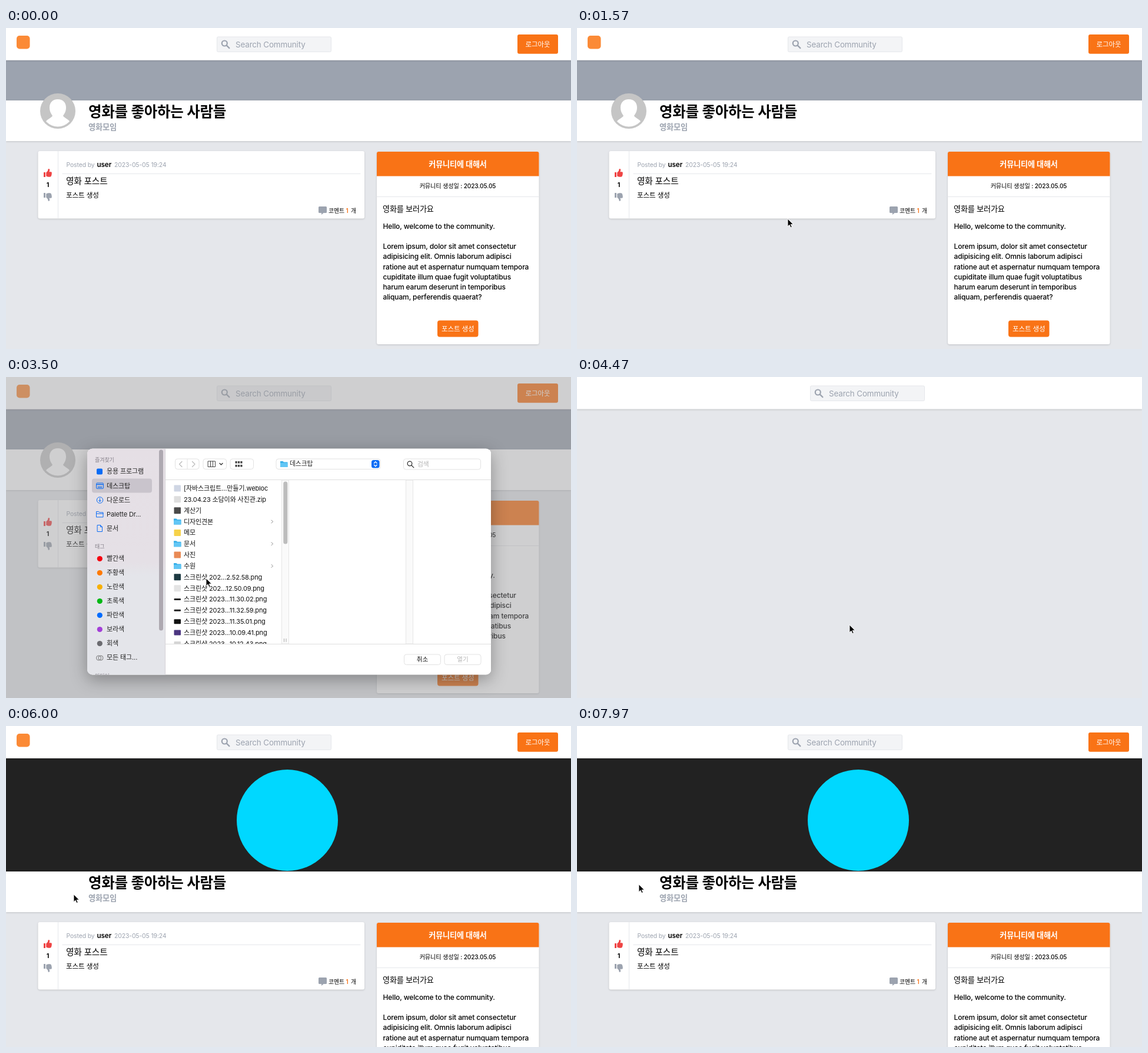
These frames come from a looping animation (960 px wide and 545 px high, 8 s). An HTML page:

```html
<!DOCTYPE html>
<html lang="ko">
<head>
<meta charset="utf-8">
<title>Community</title>
<style>
html, body { margin: 0; width: 100%; height: 100%; overflow: hidden; background: #e5e7eb; }
svg { display: block; width: 100%; height: 100%; }
text { font-family: Inter, "Noto Sans CJK KR", "Noto Sans CJK", sans-serif; letter-spacing: -.01em; white-space: pre; }
.soft { filter: drop-shadow(0 1px 1.5px rgba(0,0,0,.16)); }
#dialog { filter: drop-shadow(0 8px 14px rgba(0,0,0,.32)); }
</style>
</head>
<body>
<svg id="stage" viewBox="0 0 960 545" preserveAspectRatio="none"></svg>
<script>
const GRAY = '#9ca3af', ORANGE = '#f97316', BLUE = '#0a6cf5';

// y is the vertical middle of the line
const text = (x, y, s, size, fill = '#000', weight = 400, anchor = 'start') =>
  `<text x="${x}" y="${y + size * .36}" font-size="${size}" fill="${fill}" font-weight="${weight}" text-anchor="${anchor}">${s}</text>`;
const rect = (x, y, w, h, fill, r = 0, more = '') =>
  `<rect x="${x}" y="${y}" width="${w}" height="${h}" fill="${fill}" rx="${r}" ${more}/>`;
const circle = (x, y, r, fill, more = '') => `<circle cx="${x}" cy="${y}" r="${r}" fill="${fill}" ${more}/>`;
const path = (d, fill, stroke = 'none', width = 1, more = '') =>
  `<path d="${d}" fill="${fill}" stroke="${stroke}" stroke-width="${width}" stroke-linecap="round" stroke-linejoin="round" ${more}/>`;
const line = (d, stroke, width = 1) => path(d, 'none', stroke, width);
const group = (id, s, more = '') => `<g id="${id}" ${more}>${s}</g>`;
const lens = (x, y, r, color, width) =>
  circle(x, y, r, 'none', `stroke="${color}" stroke-width="${width}"`) +
  line(`M${x + r * .8} ${y + r * .8}l${r} ${r}`, color, width);

// ---- page ----
const thumb = 'M0 6h3v8h-3zM4.2 6.6L7 3.4Q7.4 0 8.6 0Q10.8 .4 10 3.4L9.4 5.2H12.6Q14.2 5.6 13.8 7.4Q13.6 13.4 11 13.8H7.4L4.2 12.4z';

const avatar = group('avatar',
  circle(88, 141, 30, '#c5c5c5') +
  '<g clip-path="url(#face)">' +
  path('M88 121c9 0 14 6 14 14c0 7-3 11-5 14c2 4 9 5 13 12v12h-44v-12c4-7 11-8 13-12c-2-3-5-7-5-14c0-8 5-14 14-14z', '#fff') +
  '</g>');

const heading = group('heading',
  rect(0, 123, 960, 69, '#fff', 0, 'class="soft"') + avatar +
  text(140, 142.5, '영화를 좋아하는 사람들', 24.5, '#000', 700) +
  text(140, 168, '영화모임', 13.2, GRAY, 700));

const post =
  rect(54.5, 209, 554.5, 114.5, '#fff', 3, 'class="soft"') +
  line('M88.5 209.5v113.5', '#e5e7eb') + line('M96 247.5h506', '#e5e7eb') +
  path(thumb, '#ef4444', 'none', 1, 'transform="translate(64 239)"') +
  path(thumb, GRAY, 'none', 1, 'transform="translate(64 294) scale(1 -1)"') +
  text(71, 266.5, '1', 10.5, '#000', 700, 'middle') +
  text(102.5, 232, 'Posted by', 10.4, GRAY) +
  text(154.5, 231.5, 'user', 11.7, '#000', 600) +
  text(184, 232, '2023-05-05 19:24', 10.4, GRAY) +
  text(102, 260, '영화 포스트', 14.7, '#000', 500) +
  text(102, 284, '포스트 생성', 11.6, '#000', 500) +
  path('M532.5 303h11q1.5 0 1.5 1.5v8q0 1.5-1.5 1.5h-4l-3.5 3v-3h-3.5q-1.5 0-1.5-1.5v-8q0-1.5 1.5-1.5z', GRAY) +
  text(548, 310, '코멘트', 9.9, '#000', 500) +
  text(577.5, 310, '1', 9.9, ORANGE, 600) +
  text(586, 310, '개', 9.9, '#000', 500);

const about = ['Hello, welcome to the community.', '',
  'Lorem ipsum, dolor sit amet consectetur', 'adipisicing elit. Omnis laborum adipisci',
  'ratione aut et aspernatur numquam tempora', 'cupiditate illum quae fugit voluptatibus',
  'harum earum deserunt in temporibus', 'aliquam, perferendis quaerat?'];

const side =
  rect(630, 210, 275.5, 327, '#fff', 3, 'class="soft"') +
  path('M630 251.500v-38.500q0-3 3-3h269.500q3 0 3 3v38.500z', ORANGE) +
  text(767.5, 231, '커뮤니티에 대해서', 13.1, '#fff', 600, 'middle') +
  text(767.5, 268.5, '커뮤니티 생성일 : 2023.05.05', 10.1, '#000', 500, 'middle') +
  line('M630 286.5h275.5', '#e5e7eb') +
  text(640, 307, '영화를 보러가요', 13.1, '#000', 500) +
  about.map((s, i) => text(640.5, 336.7 + i * 17.15, s, 12, '#000', 500)).join('') +
  rect(733, 496.5, 69.5, 28, ORANGE, 4) +
  text(767.8, 510.5, '포스트 생성', 11.6, '#fff', 500, 'middle');

const banner =
  group('plain', rect(0, 55, 960, 68.5, GRAY)) +
  group('cover', rect(0, 55, 960, 192, '#222') + circle(478, 160, 86, '#00d8ff'));

const nav =
  rect(0, 0, 960, 54.5, '#fff', 0, 'class="soft"') +
  group('logo', rect(18, 13, 22.5, 22.5, '#fb8a36', 5)) +
  group('search',
    rect(358.5, 15, 194, 25.5, '#f3f4f6', 2, 'stroke="#e5e7eb"') +
    lens(371.3, 26, 4.5, GRAY, 2.2) +
    text(390, 28, 'Search Community', 13.4, GRAY)) +
  group('logout', rect(869, 11, 69, 32.8, ORANGE, 3) +
    text(903.5, 27.5, '로그아웃', 11.5, '#fff', 500, 'middle'));

// ---- file dialog ----
const ROW = 18.85, SCROLL = 293.75;
const folder = (x, y) =>
  path(`M${x - 6} ${y - 5}h4.5l1.5 1.500h6.500v8.500h-12.500z`, '#35aee8') +
  rect(x - 6, y - 2.2, 12.5, 7.2, '#62c6f5', 1);

// a colour draws a square icon, none draws a folder
const files = [
  ['[자바스크립트…만들기.webloc', '#cfd6e4'], ['23.04.23 소담이와 사진관.zip', '#dedede'],
  ['계산기', '#4a4a4a'], ['디자인견본'], ['메모', '#f6d24a'], ['문서'], ['사진', '#e98a55'], ['수원'],
  ['스크린샷 202...2.52.58.png', '#1d3a42'], ['스크린샷 202...12.50.09.png', '#e4e4e4'],
  ['스크린샷 2023...11.30.02.png', '#222', 3], ['스크린샷 2023...11.32.59.png', '#222', 3],
  ['스크린샷 2023...11.35.01.png', '#111', 8], ['스크린샷 2023...10.09.41.png', '#4b3580', 9],
  ['스크린샷 2023...10.12.43.png', '#d5d5d5', 8], ['취업'], ['캘린더', '#e8574c'], ['코인 공부'],
  ['포스트생성좋아요.mov', '#333', 8], ['포트폴리오'], ['포트폴리오 참고 이미지'],
  ['AppTidier.app', '#a5713a'], ['ChatRoom_IMG'], ['Community_IMG'], ['example'],
  ['img_nuri.gif', '#a05a78'], ['J'], ['javascript -...nswers.webloc', '#cfd6e4'],
  ['Garamsolbi'], ['Norim.app', '#1ed760']];

const list = files.map(([name, color, h = 11], i) => {
  const y = 189 + i * ROW;
  return (color ? rect(285.5, y - h / 2, 11.5, h, color, 1) : folder(291, y) +
    line(`M451 ${y - 2.5}l2.5 2.5l-2.5 2.5`, '#8a8a8a')) + text(302, y, name, 11, '#111');
}).join('');

const places = ['응용 프로그램', '데스크탑', '다운로드', 'Palette Dr...', '문서'];
const tags = [['빨간색', '#f5000f'], ['주황색', '#ff7a00'], ['노란색', '#f7b000'], ['초록색', '#00b814'],
  ['파란색', '#006cff'], ['보라색', '#a33fd8'], ['회색', '#6b6b70']];

const sidebar =
  rect(138, 122, 132.5, 384, 'url(#tint)') +
  text(151, 140.5, '즐겨찾기', 9, '#86818a', 500) +
  rect(146, 172.5, 102, 24, '#c9c4cc', 4) +
  places.map((s, i) => text(171, 160.5 + i * 24.1, s, 11, '#222')).join('') +
  rect(154, 155.5, 10, 10, BLUE, 2) +
  rect(153.5, 180, 12, 9.500, 'none', 1.5, `stroke="${BLUE}"`) + line('M154 182.500h11M156 187h7', BLUE, 1.3) +
  circle(159.5, 209, 5.2, 'none', `stroke="${BLUE}"`) + line('M159.5 206v5.500m-2-2l2 2l2-2', BLUE) +
  line('M153.500 237.500v-9h4l1.500 1.500h6v7.500zM153.500 232h11.500', BLUE) +
  line('M155.500 251.500h5l3 3v8h-8zM160.500 251.500v3h3', BLUE) +
  text(151, 287.500, '태그', 9, '#86818a', 500) +
  tags.map(([s, c], i) => circle(159.3, 308.5 + i * 24, 4.6, c) + text(171, 308.5 + i * 24, s, 11, '#222')).join('') +
  circle(157.500, 477, 4, 'none', 'stroke="#777"') + circle(161, 477, 4, 'none', 'stroke="#777"') +
  text(171, 476.500, '모든 태그...', 11, '#222') +
  text(151, 507.500, '미디어', 9, '#86818a', 500) +
  rect(260, 123.500, 7, 307, '#aea9b1', 3.5) + line('M270.500 122v384', '#d4d1d6');

const box = (x, y, w, h) => rect(x, y, w, h, '#fff', 4, 'stroke="#e2e2e2"');
const dots = [0, 1, 2].map(i => rect(389.5 + i * 4.4, 143, 3.2, 3.6, '#444') + rect(389.5 + i * 4.4, 149, 3.2, 3.6, '#444')).join('');

const toolbar =
  box(287.5, 139, 40.500, 17.500) + line('M308 139.500v16.500', '#e2e2e2') +
  line('M299 143.500l-4.500 4.500l4.500 4.500M316.500 143.500l4.500 4.500l-4.500 4.500', '#b9b9b9', 1.2) +
  box(335, 139, 39.500, 17.500) + line('M343.500 143h12v9.500h-12zM347.500 143v9.500M351.500 143v9.500', '#444') +
  line('M363 146.500l2.500 2.500l2.500-2.500M408.500 146.500l2.500 2.500l2.500-2.500', '#333', 1.4) +
  box(381, 139, 39.500, 17.500) + dots +
  box(459, 139, 177, 17.500) + folder(472, 148) + text(482, 147.500, '데스크탑', 10.8, '#222') +
  rect(621, 141, 13.500, 13.500, BLUE, 3.500) +
  line('M625.500 146.200l2.300-2.500l2.300 2.500M625.500 149.300l2.300 2.500l2.300-2.500', '#fff', 1.3) +
  box(675.500, 139, 131, 18) + lens(686, 147, 3.8, '#333', 1.3) + text(699, 148, '검색', 10.8, '#b3b3b3');

const dialog = group('dialog',
  '<g clip-path="url(#frame)">' + rect(138, 121, 686, 385, '#fff') + sidebar + toolbar +
  line('M271 174.500h553M271 453.500h553', '#dedede') +
  `<g clip-path="url(#view)">${group('list', list)}</g>` +
  [468.5, 679.5].map(x => rect(x, 175, 12, 278, '#fafafa', 0, 'stroke="#e6e6e6"')).join('') +
  line('M472.500 444.500v5M476 444.500v5', '#aaa') +
  rect(471.3, 177.5, 7, 106, '#bdbdbd', 3.5, 'id="bar"') +
  box(676.5, 471, 62, 17.500) + text(707.500, 479.500, '취소', 10.6, '#111', 400, 'middle') +
  box(745, 471, 62, 17.500) + text(776, 479.500, '열기', 10.6, '#b5b5b5', 400, 'middle') + '</g>');

document.getElementById('stage').innerHTML =
  `<defs>
    <clipPath id="face">${circle(88, 141, 26.500, '#000')}</clipPath>
    <clipPath id="frame">${rect(138, 121.500, 686.500, 384, '#000', 9)}</clipPath>
    <clipPath id="view">${rect(271, 175, 200, 278, '#000')}</clipPath>
    <linearGradient id="tint" x1="0" y1="0" x2="0" y2="1">
      <stop offset="0" stop-color="#e5dfe5"/><stop offset=".5" stop-color="#e5e0e6"/><stop offset=".56" stop-color="#e4e5ea"/>
    </linearGradient>
  </defs>` +
  rect(0, 0, 960, 545, '#e5e7eb') +
  group('page', banner + group('content', heading + post + side)) + nav +
  rect(0, 0, 960, 545, '#969698', 0, 'id="dim"') + dialog +
  path('M0 0V12.800L3 10L5 14.600L7.200 13.600L5.200 9.200H9.200z', '#000', '#fff', .9, 'id="cursor"');

// ---- motion ----
const $ = Object.fromEntries([...document.querySelectorAll('[id]')].map(e => [e.id, e]));
const LOOP = 8000, FADE = 90;
const opened = [[560, 1300], [2700, 3700], [6350, 6740]];
const reloads = [[4465, 4600], [7200, 7330]];
const trail = [[30, 300, 215], [420, 96, 146], [560, 96, 146], [760, 340, 325], [930, 352, 337], [1300, 352, 337],
  [1700, 360, 320], [1970, 396, 403], [2130, 397, 403], [2270, 446, 387], [2430, 446, 387], [2640, 515, 97],
  [2820, 515, 97], [3270, 340, 342], [3600, 340, 342], [3970, 462, 420], [4130, 462, 420], [4270, 463, 421],
  [5130, 463, 421], [5930, 115, 286], [6000, 115, 286], [6130, 117, 297], [6350, 117, 297], [6560, 320, 340],
  [6650, 320, 340], [6800, 145, 320], [7070, 130, 300], [7570, 130, 300], [7960, 105, 269]];

const clamp = v => Math.min(1, Math.max(0, v));
const ease = v => { v = clamp(v); return v * v * (3 - 2 * v); };
const show = (el, on) => el.setAttribute('visibility', on ? 'inherit' : 'hidden');
const move = (el, x, y) => el.setAttribute('transform', `translate(${x} ${y})`);

function along(t) {
  const i = trail.findIndex(k => k[0] > t);
  if (i < 1) return (i ? trail[trail.length - 1] : trail[0]).slice(1);
  const [a, b] = [trail[i - 1], trail[i]], u = ease((t - a[0]) / (b[0] - a[0]));
  return [a[1] + (b[1] - a[1]) * u, a[2] + (b[2] - a[2]) * u];
}

function draw(t) {
  const blank = reloads.some(([a, b]) => t >= a && t < b);
  const covered = t >= reloads[0][1];
  show($.page, !blank);
  show($.logout, !blank);
  show($.logo, t < reloads[0][0] || (t >= 4780 && t < reloads[1][0]));
  show($.plain, !covered);
  show($.cover, covered);
  show($.avatar, !covered);
  move($.content, 0, covered ? 124 : 0);
  move($.search, blank ? 38 : 0, 0);

  const open = Math.max(...opened.map(([a, b]) => Math.min(clamp((t - a) / FADE), clamp((b - t) / FADE))));
  show($.dialog, open > 0);
  $.dialog.setAttribute('opacity', open);
  $.dim.setAttribute('opacity', open * .45);
  const scroll = t < 2000 ? ease((t - 740) / 170) : 0;
  move($.list, 0, -SCROLL * scroll);
  move($.bar, 0, 104 * scroll);

  show($.cursor, t >= 30);
  move($.cursor, ...along(t));
}

let start;
function tick(now) {
  start ??= now;
  draw((now - start) % LOOP);
  requestAnimationFrame(tick);
}
draw(0);
requestAnimationFrame(tick);
</script>
</body>
</html>
```
